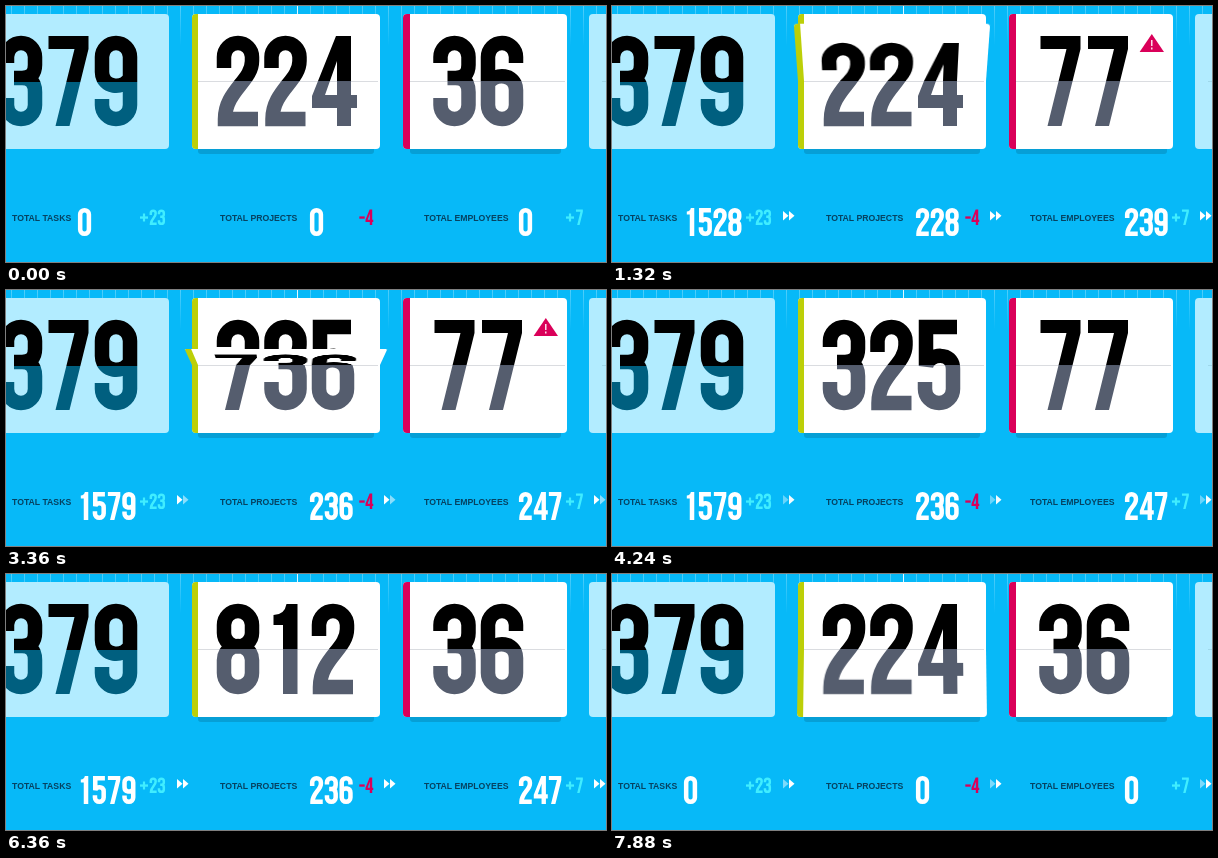
Recreate the animation shown at these times as an HTML page. Size 600 by 256 pixels, loop 7.92 s.

```html
<!DOCTYPE html>
<html lang="en">
<head>
<meta charset="utf-8">
<title>Flip counters</title>
<style>
  html, body { margin: 0; width: 100%; height: 100%; overflow: hidden; background: #07b9f8; }
  #stage { position: relative; width: 600px; height: 256px; overflow: hidden; }
  #stage > svg { position: absolute; left: 0; top: 0; }
  svg { display: block; }
  .card { position: absolute; top: 8px; height: 135px; }
  .half { position: absolute; left: 0; width: 100%; }
  .seam { position: absolute; left: 6px; right: 2px; top: 67px; height: 1px; background: rgba(70, 80, 100, .2); }
  text { font: bold 8.7px "Liberation Sans", Arial, sans-serif; fill: #064261; }
</style>
</head>
<body>
<div id="stage">
  <svg id="base" width="600" height="256"></svg>
  <svg id="over" width="600" height="256"></svg>
</div>
<script>
const LOOP = 7920, STEP = 40, TOP = 67, HEIGHT = 135, ADVANCE = 47.5;
const RED = '#da0059';
const stage = document.getElementById('stage');
const base = document.getElementById('base');
const over = document.getElementById('over');

// Condensed digits in a 42 x 90 box: thick strokes or solid outlines.
const STROKES = {
  0: 'M7 21A14 14 0 0 1 35 21V69A14 14 0 0 1 7 69Z',
  2: 'M7 32V21A14 14 0 0 1 35 21V25C35 45 8 55 8 83H41',
  3: 'M7 27V21A14 14 0 0 1 35 21V29Q35 42 22 42H14M22 42Q35 42 35 56V69A14 14 0 0 1 7 69V62',
  5: 'M39 7H8V46C11 33 35 31 35 49V69A14 14 0 0 1 7 69V62',
  6: 'M35 27V21A14 14 0 0 0 7 21V69A14 14 0 0 0 35 69V54C35 38 14 36 7 48',
  8: 'M21 7A14 14 0 0 1 35 21V29A13.5 13 0 0 1 7 29V21A14 14 0 0 1 21 7ZM21 42A14 14 0 0 1 35 56V69A14 14 0 0 1 7 69V56A14 14 0 0 1 21 42Z',
  9: 'M7 63V69A14 14 0 0 0 35 69V21A14 14 0 0 0 7 21V36C7 52 28 54 35 42'
};
const SOLIDS = {
  1: 'M9 11Q20 11 22 0H33V90H18.5V21H9Z',
  4: 'M24 0H39V59H45V72H39V90H25V72H0V60ZM25 25L13 59H25Z',
  7: 'M1 0H41V13L22 90H8L27 13H1Z'
};

function digits(value, x, y, height, color) {
  const paths = [...String(value)].map((d, i) => {
    const look = STROKES[d]
      ? `d="${STROKES[d]}" fill="none" stroke="${color}" stroke-width="14.5"`
      : `d="${SOLIDS[d]}" fill="${color}" fill-rule="evenodd"`;
    return `<path transform="translate(${i * ADVANCE})" ${look}/>`;
  });
  return `<g transform="translate(${x} ${y}) scale(${height / 90})">${paths.join('')}</g>`;
}

const rect = (x, y, w, h, fill, extra = '') =>
  `<rect x="${x}" y="${y}" width="${w}" height="${h}" fill="${fill}" ${extra}/>`;

const clamp = (v, lo = 0, hi = 1) => Math.min(hi, Math.max(lo, v));
const easeOut = u => 1 - (1 - u) ** 2;
const easeSine = u => (1 - Math.cos(Math.PI * u)) / 2;

// Backdrop: grid lines, pale side cards, shadows.
function drawBase() {
  let s = '<defs><linearGradient id="fade" x1="0" y1="0" x2="0" y2="1">' +
    '<stop offset="0" stop-color="#fff" stop-opacity=".3"/><stop offset="1" stop-color="#fff" stop-opacity="0"/></linearGradient>' +
    '<clipPath id="upper"><path d="M0 0H600V76H0Z"/></clipPath>' +
    '<clipPath id="lower"><path d="M0 76H600V256H0Z"/></clipPath></defs>';
  for (let x = 5; x < 600; x += 13) s += rect(x, 0, 1, 40, 'url(#fade)');
  s += rect(291, 0, 1, 8, '#fff', 'opacity=".85"');
  s += rect(-20, 8, 183, HEIGHT, '#b2ecff', 'rx="4"');
  s += rect(583, 8, 40, HEIGHT, '#b2ecff', 'rx="4"');
  s += rect(596, 75, 4, 1, '#9fd8ea');
  s += `<g clip-path="url(#upper)">${digits(379, -6, 30, 90, '#000')}</g>`;
  s += `<g clip-path="url(#lower)">${digits(379, -6, 30, 90, '#005f7f')}</g>`;
  s += rect(192, 138, 176, 10, '#069fd6', 'rx="3"') + rect(404, 138, 151, 10, '#069fd6', 'rx="3"');
  base.innerHTML = s;
}

// Flip cards: each flip is [start, duration, new number].
const cards = [
  { x: 186, w: 188, inset: 25, color: '#bccf08', first: 224, skew: 0, samples: 1, stripe: 6,
    flips: [[1000, 1100, 736], [2860, 1100, 325], [4803, 1100, 812], [6927, 1100, 224]] },
  { x: 397, w: 164, inset: 30.5, color: RED, first: 36, skew: 25, samples: 5, stripe: 7,
    flips: [[366, 800, 77], [4260, 800, 36]] }
];

function setHalf(el, card, num, top) {
  const key = num + (top ? 't' : 'b');
  if (el.key === key) return;
  el.key = key;
  const y = top ? 0 : TOP, h = top ? TOP : HEIGHT - TOP, r = card.stripe;
  el.style.top = y + 'px';
  el.style.height = h + 'px';
  el.style.transformOrigin = top ? '50% 100%' : '50% 0';
  el.innerHTML = `<svg width="${card.w}" height="${h}" viewBox="0 ${y} ${card.w} ${h}">` +
    rect(0, 0, card.w, HEIGHT, '#fff', 'rx="4"') +
    `<path fill="${card.color}" d="M${r} 0V${HEIGHT}H4Q0 ${HEIGHT} 0 ${HEIGHT - 4}V4Q0 0 4 0Z"/>` +
    digits(num, card.inset, 22, 90, top ? '#000' : '#555d6e') + '</svg>';
}

function addDiv(parent, name) {
  const el = document.createElement('div');
  el.className = name;
  parent.appendChild(el);
  return el;
}

function buildCard(card) {
  const box = addDiv(stage, 'card');
  box.style.left = card.x + 'px';
  box.style.width = card.w + 'px';
  card.top = addDiv(box, 'half');
  card.bottom = addDiv(box, 'half');
  card.flaps = Array.from({ length: card.samples }, () => addDiv(box, 'half'));
  addDiv(box, 'seam');
}

function drawCard(card, t) {
  let from = card.first, to = card.first, start = 0, length = 0;
  for (const [at, dur, num] of card.flips) {
    if (t < at) break;
    from = to; to = num; start = at; length = dur;
  }
  const moving = length > 0 && t < start + length;
  setHalf(card.top, card, to, true);
  setHalf(card.bottom, card, moving ? from : to, false);

  // Several nearby poses, most edge-on first, give the motion blur.
  const n = card.samples;
  const angles = card.flaps.map((_, i) => {
    const shift = n > 1 ? (i / (n - 1) - .5) * STEP : 0;
    return 180 * easeSine(clamp((t + shift - start) / (length || 1)));
  }).sort((a, b) => Math.abs(a - 90) - Math.abs(b - 90));
  card.flaps.forEach((el, i) => {
    el.style.display = moving ? 'block' : 'none';
    if (!moving) return;
    const a = angles[i], top = a < 90;
    setHalf(el, card, top ? from : to, top);
    const lean = -card.skew * Math.sin(a * Math.PI / 90) / .866;
    el.style.transform = `skewX(${lean}deg) perspective(900px) rotateX(${top ? -a : 180 - a}deg)`;
    el.style.opacity = 1 / (i + 1);
  });
}

// Totals row.
const totals = [
  { label: 'TOTAL TASKS', x: 6, numX: 72, max: 1579, arrow: 171 },
  { label: 'TOTAL PROJECTS', x: 214, numX: 304, max: 236, arrow: 378 },
  { label: 'TOTAL EMPLOYEES', x: 418, numX: 513, max: 247, arrow: 588 }
];
const CYAN = '#40edff';

function buildOver() {
  const plus = x => rect(x, 210.4, 8, 2.3, CYAN) + rect(x + 2.9, 207.5, 2.2, 8, CYAN);
  over.innerHTML = totals.map(o => {
    const tri = x => `<path class="arrow" fill="#fff" d="M${x} 205L${x + 5.5} 209.7L${x} 214.4Z"/>`;
    return `<text x="${o.x}" y="215">${o.label}</text><g class="count"></g>` + tri(o.arrow) + tri(o.arrow + 6);
  }).join('') +
    plus(134) + digits(23, 143.6, 203.5, 15.5, CYAN) +
    rect(353.3, 210.4, 5.4, 2.3, RED) + digits(4, 359.5, 203.5, 15.5, RED) +
    plus(560) + digits(7, 569.8, 203.5, 15.5, CYAN) +
    `<g id="alert"><path fill="${RED}" d="M539.8 28L552 46H527.6Z"/>` +
    '<path stroke="#fff" stroke-width="1.3" d="M539.8 34V40M539.8 41.6V43.4"/></g>';
  stage.appendChild(over);
}

function drawTotals(t) {
  const share = t < 4000
    ? easeOut(clamp((t - 60) / 1535))
    : 1 - easeOut(clamp((t - 6820) / 780));
  over.querySelectorAll('.count').forEach((g, i) => {
    const value = Math.round(totals[i].max * share);
    if (g.value === value) return;
    g.value = value;
    g.innerHTML = digits(value, totals[i].numX, 202, 28, '#fff');
  });

  // Arrow pulse pauses while the board rests.
  const run = t - clamp(t - 2360, 0, 480) - clamp(t - 6360, 0, 480);
  const phase = run / 320 % 1;
  const dip = (centre, reach) => {
    const d = Math.abs(phase - centre);
    return 1 - .6 * clamp(1.4 * (1 - Math.min(d, 1 - d) / reach));
  };
  const fade = clamp((t - 40) / 160);
  const levels = [dip(.72, .25), dip(.92, .18)];
  over.querySelectorAll('.arrow').forEach((el, i) => el.setAttribute('opacity', fade * levels[i % 2]));
}

function drawAlert(t) {
  const shown = clamp((t - 1080) / 240) * (1 - clamp((t - 3900) / 160));
  const size = .5 + .5 * easeOut(shown);
  const el = document.getElementById('alert');
  el.setAttribute('opacity', shown);
  el.setAttribute('transform', `translate(539.8 38) scale(${size}) translate(-539.8 -38)`);
}

function frame() {
  const t = Math.floor(performance.now() % LOOP / STEP) * STEP;
  cards.forEach(card => drawCard(card, t));
  drawTotals(t);
  drawAlert(t);
  requestAnimationFrame(frame);
}

drawBase();
cards.forEach(buildCard);
buildOver();
frame();
</script>
</body>
</html>
```
